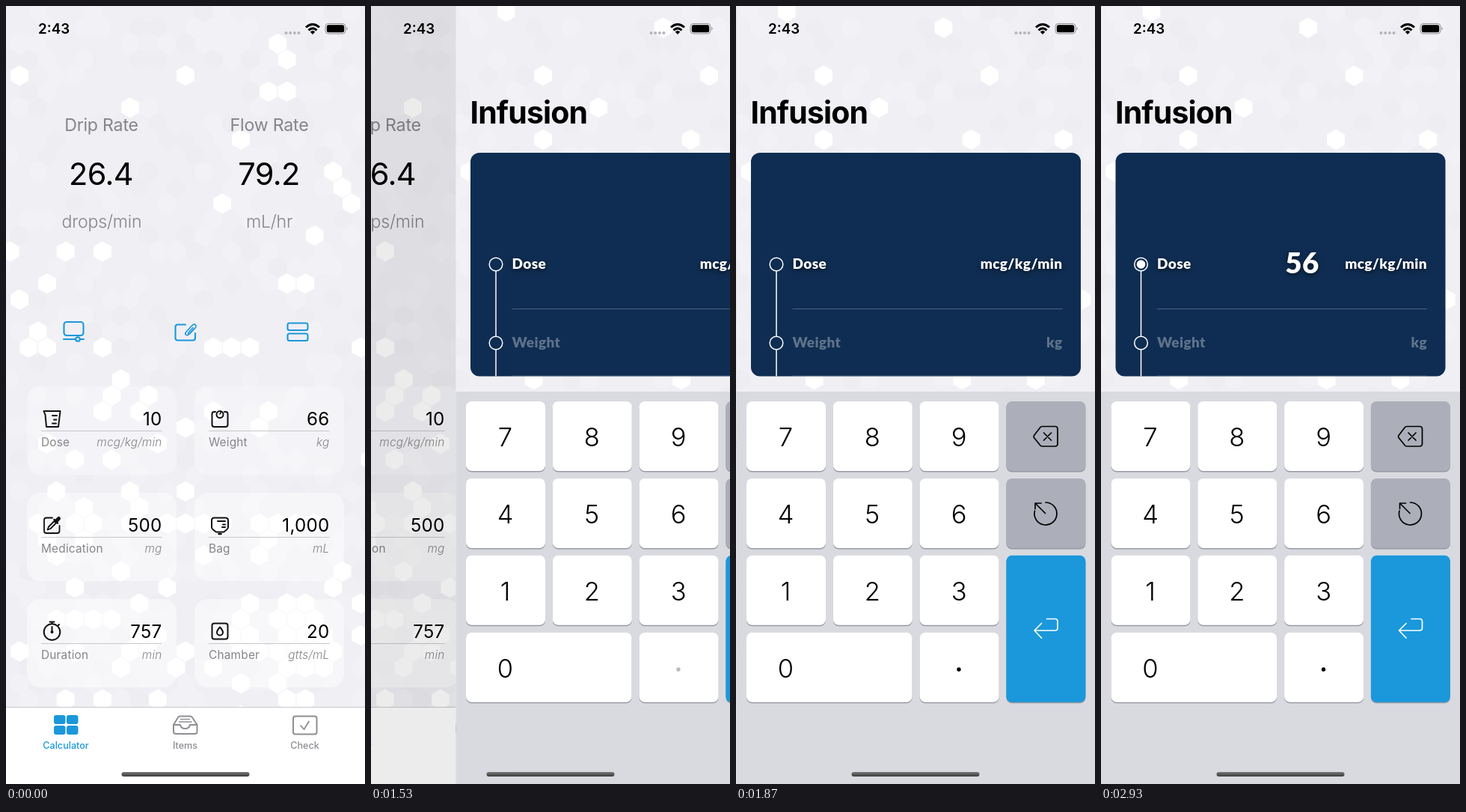
An HTML page for the animation above (3030 ms loop, 480x1039 px).

```html
<!DOCTYPE html>
<html lang="en">
<head>
<meta charset="utf-8">
<title>Infusion calculator</title>
<style>
  html, body { margin: 0; height: 100%; overflow: hidden; background: #efeff4; }
  svg { display: block; width: 100vw; height: 100vh; font-family: Inter, "Noto Sans", sans-serif; }
  text { stroke: none; }
  .mid { text-anchor: middle; }
  .end { text-anchor: end; }
  .line { fill: none; stroke-linecap: round; stroke-linejoin: round; }
  .head { font-size: 23.2px; letter-spacing: -.01em; fill: #85858a; }
  .thin { font-weight: 300; }
  .rate { font-size: 41.5px; letter-spacing: -.014em; }
  .value { font-size: 24.2px; letter-spacing: .01em; }
  .label { font-size: 15.4px; letter-spacing: .013em; fill: #85858a; }
  .unit { font-style: italic; font-weight: 300; }
  .tab { font-size: 12.6px; font-weight: 500; }
  .title { font-size: 41px; font-weight: 700; letter-spacing: -.021em; }
  .digit { font-size: 34.5px; font-weight: 300; }
  .form { font: 900 19px Lato, "Open Sans", sans-serif; letter-spacing: .02em; fill: #fff; }
  .form .lit { filter: drop-shadow(0 2px 3px #0009); }
  .form .big { font-size: 38.5px; }
</style>
</head>
<body>
<svg viewBox="0 0 480 1039" preserveAspectRatio="none">
  <defs>
    <linearGradient id="bar" x2="0" y2="1">
      <stop stop-color="#777"/><stop offset="1" stop-color="#3c3c3e"/>
    </linearGradient>
    <clipPath id="pageClip"><rect width="480" height="1039"/></clipPath>
    <clipPath id="cardClip"><rect x="19.5" y="196" width="441" height="298.5" rx="12"/></clipPath>
  </defs>

  <g id="home">
    <rect width="480" height="1039" fill="#efeff4"/>
    <g id="homeHexes" clip-path="url(#pageClip)"></g>
    <g class="mid">
      <text class="head" x="127.5" y="167">Drip Rate</text>
      <text class="head" x="352" y="167">Flow Rate</text>
      <text class="rate" x="127" y="238.5">26.4</text>
      <text class="rate" x="351.5" y="238.5">79.2</text>
      <text class="head thin" x="128" y="296">drops/min</text>
      <text class="head thin" x="352" y="296">mL/hr</text>
    </g>
    <g class="line" stroke="#1a98db" stroke-width="2.1">
      <rect x="77.5" y="422" width="26" height="18" rx="3.5"/>
      <path d="M77 445H92.5M99.5 445H104"/><circle cx="96" cy="445" r="2.8"/>
      <path d="M240 425.5H229.5Q226.5 425.5 226.5 428.5V443.5Q226.5 446.5 229.5 446.5H250Q253 446.5 253 443.5V437"/>
      <path stroke-width="1.6" d="M251.5 431L244.5 438.5C241.5 441.5 238 438 241 435L249 426.5C252 423 256 427 253 430L246 437.5C244.5 439 242.5 437.5 244 436L250 429.5"/>
      <g id="formIcon"><rect x="376.5" y="423.5" width="27" height="9.5" rx="2.5"/><rect x="376.5" y="437.5" width="27" height="9.5" rx="2.5"/></g>
    </g>
    <g id="cards"></g>
    <g class="line" stroke="#111" stroke-width="2">
      <path d="M50.5 541H72.5L70 562H54L52.5 546ZM62 547H68M64 552.5H67.5M62 557.5H67"/>
      <path d="M280 542H278Q275.5 542 275.5 545V559Q275.5 562 278.5 562H293.5Q296.5 562 296.5 559V545Q296.5 542 294 542H292"/>
      <circle cx="286" cy="545.5" r="4.5"/><path d="M286 545L287.5 542.5" stroke-width="1.5"/>
      <path d="M62 683.5H54Q51 683.5 51 686.5V701Q51 704 54 704H68.5Q71.5 704 71.5 701V694M55.5 699.5L57 695.5L64.5 688L67 690.5L59.5 698Z" stroke-width="1.8"/>
      <path d="M64.5 686L69 690.5" stroke-width="2.5"/><path d="M68 687L70.5 684.5" stroke-width="5"/>
      <path d="M278.5 683.5H293.5Q297 683.5 297 687V696Q297 698 295 699.5L291 702.5H281L277 699.5Q275 698 275 696V687Q275 683.5 278.5 683.5ZM283 688H293M290 692.5H293M289 696H293"/>
      <path d="M284.5 705H287.5" stroke-width="2.5"/>
      <circle cx="61.5" cy="836" r="10.8"/><path d="M58.5 822.5H64.5M61.5 823V825M61.5 829V836M70 827L71 826"/><circle cx="61.5" cy="836" r="1"/>
      <rect x="275.5" y="824.5" width="21" height="21" rx="3"/>
      <path d="M286 829.5Q290 834 290 836.5A4 4 0 0 1 282 836.5Q282 834 286 829.5Z"/>
    </g>
    <rect y="936" width="480" height="103" fill="#fff"/>
    <path d="M0 936.5H480" stroke="#c9c9cd"/>
    <g fill="#1a98db">
      <rect x="64" y="947" width="15.5" height="12" rx="3"/><rect x="81" y="947" width="15.5" height="12" rx="3"/>
      <rect x="64" y="961" width="15.5" height="12" rx="3"/><rect x="81" y="961" width="15.5" height="12" rx="3"/>
    </g>
    <g class="line" stroke="#8e8e93" stroke-width="2">
      <path d="M224 960L230 950Q231 948.5 233 948.5H246Q248 948.5 249 950L255.5 960V969Q255.5 972 252.5 972H227Q224 972 224 969ZM224 960H233Q234 965 239.5 965T246 960H255.5"/>
      <path d="M233.5 952.5H245.5M231.5 956H248" stroke-width="1.5"/>
      <rect x="384" y="948.5" width="31.5" height="24" rx="3"/><path d="M394 961L398.5 966L405 955.5" stroke-width="1.8"/>
    </g>
    <g class="mid tab" fill="#8e8e93">
      <text x="80" y="992" fill="#1a98db">Calculator</text><text x="239.5" y="992">Items</text><text x="399.5" y="992">Check</text>
    </g>
  </g>
  <rect id="dim" width="480" height="1039" opacity="0"/>

  <g id="form">
    <rect width="480" height="1039" fill="#efeff4"/>
    <g id="formHexes" clip-path="url(#pageClip)"></g>
    <text class="title" x="19" y="157">Infusion</text>
    <g clip-path="url(#cardClip)" class="form">
      <rect x="19" y="196" width="442" height="299" fill="#0f2d52"/>
      <path d="M75 404.5H436M75 494H436" stroke="#fff" opacity=".25"/>
      <g fill="none" stroke="#fff" stroke-width="1.5">
        <path d="M53.5 354V441M53.5 459V495"/><circle cx="53.5" cy="345" r="8.8"/><circle cx="53.5" cy="450" r="8.8"/>
      </g>
      <circle id="filled" cx="53.5" cy="345" r="5.8"/>
      <text class="lit" x="75" y="351">Dose</text>
      <text class="lit end" x="436" y="351">mcg/kg/min</text>
      <text id="entry" class="lit mid big" y="357"></text>
      <g opacity=".33"><text x="75" y="456">Weight</text><text class="end" x="436" y="456">kg</text></g>
    </g>
    <rect y="515" width="480" height="524" fill="#d9dae0"/>
    <g id="keys"></g>
    <g class="line" stroke="#000" stroke-width="1.7">
      <path d="M409 561.5H426Q429.5 561.5 429.5 565V584.5Q429.5 588 426 588H409Q407.5 588 406.5 587L398 576.5Q397 575 398 573.5L406.5 562.5Q407.5 561.5 409 561.5ZM411 570L421 580M421 570L411 580"/>
      <path d="M413.5 663A15 15 0 1 1 399 674M413 677.5L399.5 664M399.5 671.5V664H407.5"/>
      <path d="M415 818.5H426Q429.5 818.5 429.5 822V830.5Q429.5 834 426 834H399M408 824.5L398.5 834L408 844" stroke="#fff"/>
    </g>
    <circle id="point" cx="297.5" cy="886" r="2.7"/>
  </g>

  <g>
    <text x="43" y="37" font-size="18.8" font-weight="600">2:43</text>
    <g fill="#b5b5ba"><circle cx="374.5" cy="36" r="2"/><circle cx="380.2" cy="36" r="2"/><circle cx="385.9" cy="36" r="2"/><circle cx="391.5" cy="36" r="2"/></g>
    <g fill="none" stroke="#000" stroke-width="3"><path d="M401 28.5Q410 20.5 419 28.5M404.5 32.3Q410 27.5 415.5 32.3"/></g>
    <path d="M406.7 34.5Q410 31.5 413.3 34.5L410 38Z"/>
    <rect x="427" y="23.5" width="27" height="13.5" rx="4" fill="none" stroke="#8d8d92"/>
    <rect x="428.8" y="25.3" width="23.4" height="9.9" rx="2.5"/>
    <path d="M455.5 28Q458 30.2 455.5 32.5Z" fill="#8d8d92"/>
    <rect x="154.5" y="1023" width="171" height="6" rx="3" fill="url(#bar)"/>
  </g>
</svg>
<script>
const $ = id => document.getElementById(id);
const LOOP = 3030, BLUE = '#1a98db', GREY = '#acaeba';
const clamp = v => Math.max(0, Math.min(1, v));

// Hexagon backdrop: chosen white cells as [row, columns...], the rest seeded
const R = 14.24, STEP_X = R * Math.sqrt(3), STEP_Y = R * 1.5;
const CARD_X = [28, 252], CARD_Y = [508, 650, 792];

function cardRow(x, y) {
  if (!CARD_X.some(left => x > left + 8 && x < left + 192)) return -1;
  return CARD_Y.findIndex(top => y > top + 8 && y < top + 110);
}

function hexes(seed, whites, dense) {
  const rnd = () => (seed = (seed * 16807) % 2147483647) / 2147483647;
  const paths = { '#ebebf0': '', '#f4f4f8': '', '#fff': '' };
  for (let row = -5; row < 41; row++) {
    const listed = whites.find(w => w[0] === row) || [];
    for (let col = -1; col < 20; col++) {
      const x = 18 + STEP_X * (col + (row & 1) / 2), y = 93 + STEP_Y * row;
      const a = rnd(), inCard = cardRow(x, y);
      const chance = !dense || y < 510 ? 0 : inCard < 0 ? (y - 480) / 2000 : .08 + inCard * .2;
      const white = listed.slice(1).includes(col) || rnd() < chance;
      const shade = white ? '#fff' : a < .15 ? '#ebebf0' : a > .77 ? '#f4f4f8' : '';
      if (!shade) continue;
      const r = R - .5, w = r * .866;
      paths[shade] += `M${x} ${y - r}l${w} ${r / 2}v${r}l${-w} ${r / 2}l${-w} ${-r / 2}v${-r}Z`;
    }
  }
  return Object.entries(paths).map(([fill, d]) =>
    `<path d="${d}" fill="${fill}" opacity="${fill === '#fff' ? 1 : .45}"/>`).join('');
}

$('homeHexes').innerHTML = hexes(71, [
  [-2, 14], [-1, 14], [0, 0, 9], [1, 13, 14], [2, 6], [4, 12], [6, 17], [7, 17], [8, 11, 18],
  [10, 16], [11, -1, 2, 4], [13, 1, 14, 15], [14, 0], [16, 1],
  [17, 0, 1, 4, 10, 11, 12, 18], [19, 5], [20, 5]], true);
$('formHexes').innerHTML = hexes(1234, [
  [-4, 2], [-3, 10], [0, 4, 13], [2, 7], [4, 4, 12, 17], [6, 0], [14, 18], [19, 3, 11, 15]], false);

const fields = [
  ['Dose', '10', 'mcg/kg/min'], ['Weight', '66', 'kg'],
  ['Medication', '500', 'mg'], ['Bag', '1,000', 'mL'],
  ['Duration', '757', 'min'], ['Chamber', '20', 'gtts/mL']];
$('cards').innerHTML = fields.map(([label, value, unit], i) => {
  const x = CARD_X[i % 2], y = CARD_Y[i >> 1], left = x + 19, right = x + 180.5;
  return `<rect x="${x}" y="${y}" width="200" height="118" rx="18" fill="#fff" opacity="${.32 + .1 * (i >> 1)}"/>
    <path d="M${left} ${y + 59.5}H${right}" stroke="#c8c8cc"/>
    <text class="value end" x="${right}" y="${y + 52}">${value}</text>
    <text class="label" x="${left}" y="${y + 80}">${label}</text>
    <text class="label unit end" x="${right}" y="${y + 80}">${unit}</text>`;
}).join('');

// Keypad
function key(col, row, { w = 106, h = 93, fill = '#fff', digit = '' } = {}) {
  const x = 13.5 + col * 115.8, y = 528 + row * 102.9;
  const box = (dy, color, attrs = '') =>
    `<rect ${attrs} x="${x}" y="${y + dy}" width="${w}" height="${h}" rx="7.5" fill="${color}"/>`;
  return box(1.5, '#9799a3') + box(0, fill) + (digit === '' ? '' :
    box(0, GREY, `id="press${digit}" opacity="0"`) +
    `<text id="digit${digit}" class="digit mid" x="${x + 52.5}" y="${y + 60}">${digit}</text>`);
}
let keys = key(0, 3, { w: 221.5, digit: 0 }) + key(2, 3) +
  key(3, 0, { fill: GREY }) + key(3, 1, { fill: GREY }) + key(3, 2, { h: 196, fill: BLUE });
for (let n = 1; n < 10; n++) keys += key((n - 1) % 3, 2 - Math.floor((n - 1) / 3), { digit: n });
$('keys').innerHTML = keys;

// Full while held, then fades after release
const held = (t, down, up, fade = 150) => t < down ? 0 : clamp(1 - (t - up) / fade);

function pressKey(n, amount) {
  $('press' + n).setAttribute('opacity', amount);
  $('digit' + n).setAttribute('opacity', 1 - .75 * amount);
}

// Critically damped push from the right
function pushLeft(t) {
  if (t > 1900) return 0;
  const s = Math.max(0, t - 1394.5) * .0203;
  return (1 + s) * Math.exp(-s);
}

function draw(now) {
  const t = now % LOOP, left = pushLeft(t);
  $('form').setAttribute('transform', `translate(${Math.ceil(960 * left) / 2})`);
  $('home').setAttribute('transform', `translate(${-144 * (1 - left)})`);
  $('dim').setAttribute('opacity', .1 * (1 - left));
  $('formIcon').setAttribute('stroke', t >= 1230 && t < 1430 ? '#166a9c' : BLUE);
  $('point').setAttribute('opacity', .27 + .73 * clamp((t - 1620) / 200));

  pressKey(5, held(t, 2010, 2110));
  pressKey(6, held(t, 2430, 2530));
  const both = t >= 2530, shown = clamp((t - 2110) / 100);
  $('entry').textContent = both ? '56' : '5';
  $('entry').setAttribute('x', both ? 269 : 274.5);
  $('entry').setAttribute('opacity', shown);
  $('filled').setAttribute('opacity', shown);
  requestAnimationFrame(draw);
}
draw(performance.now());
</script>
</body>
</html>
```
